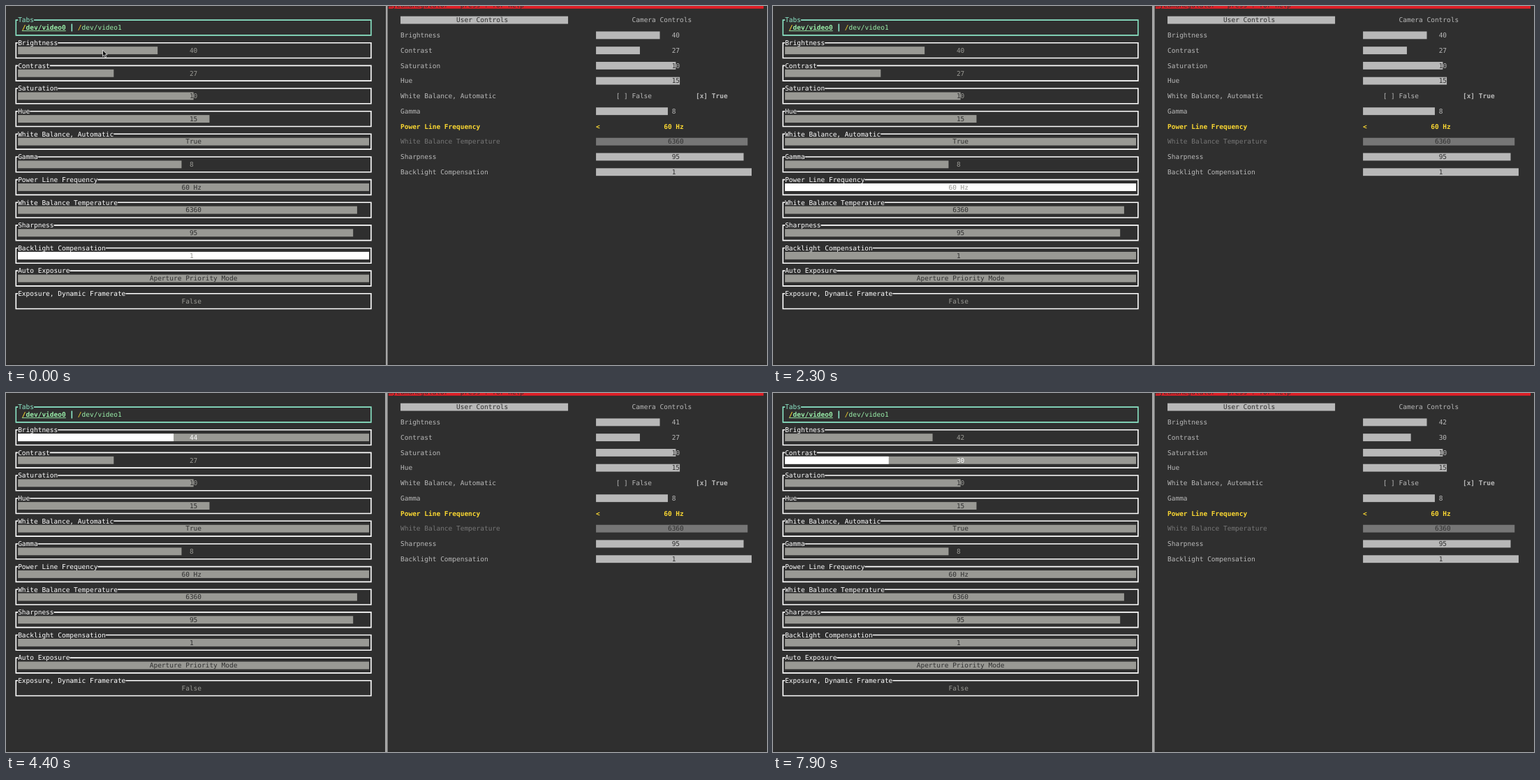
An HTML page that plays this animation: 1090x514 px, repeating every 8000 ms.

```html
<!DOCTYPE html>
<html lang="en">
<head>
<meta charset="utf-8">
<title>Video controls</title>
<style>
html, body { margin: 0; width: 100%; height: 100%; overflow: hidden; background: #2f2f2f; }
svg { display: block; }
text {
  font: 9.493px "DejaVu Sans Mono", monospace;
  text-rendering: geometricPrecision;
  white-space: pre;
}
.bold { font-weight: bold; }
</style>
</head>
<body>
<svg id="stage" width="1090" height="514" viewBox="0 0 1090 514"></svg>
<script>
const CELL = 5.715, LINE = 10.88, TOP = 3.8, RIGHT = 547.9, LOOP = 8000;
const BG = '#2f2f2f', GRAY = '#999994', WHITE = '#fff', SILVER = '#b8b8b8',
      DIM = '#767676', YELLOW = '#fad732', TEAL = '#8be5c6', GREEN = '#9aefaa';
const stage = document.getElementById('stage');

function add(tag, attrs, parent = stage) {
  const el = document.createElementNS('http://www.w3.org/2000/svg', tag);
  for (const key in attrs) el.setAttribute(key, attrs[key]);
  parent.appendChild(el);
  return el;
}
const rowY = row => TOP + row * LINE;
const rect = (x, y, width, height, fill) => add('rect', { x, y, width, height, fill });
const bar = (x, row, cols, fill) => rect(x, rowY(row), cols * CELL, LINE, fill);

function label(x, row, str, fill, bold) {
  const el = add('text', { x, y: rowY(row) + 8.7, fill });
  el.textContent = str;
  if (bold) el.setAttribute('class', 'bold');
  return el;
}

// Titled frame drawn through the middle of its border cells
function frame(row, title, color) {
  const x0 = 2.5 * CELL, x1 = 91.5 * CELL;
  const y0 = rowY(row + .5), y1 = rowY(row + 2.5);
  const gap = (3 + title.length) * CELL;
  add('path', {
    d: `M${3 * CELL} ${y0}H${x0}V${y1}H${x1}V${y0}H${gap}`,
    fill: 'none', stroke: color, 'stroke-width': 1.6
  });
  label(3 * CELL, row, title, color);
}

// Progress bar whose caption changes colour where the fill ends
function meter(x, row, cols, round) {
  const back = bar(x, row, cols, GRAY);
  const fill = bar(x, row, 0, GRAY);
  const text = label(x, row, '', GRAY);
  let last = '';
  return (value, part, look) => {
    const key = value + '/' + part + '/' + look.join();
    if (key === last) return;
    last = key;
    const [backColor, fillColor, onFill, onBack] = look;
    const str = String(value), start = round((cols - str.length) / 2);
    const full = Math.round(cols * part);
    back.setAttribute('fill', backColor);
    fill.setAttribute('fill', fillColor);
    fill.setAttribute('width', full * CELL);
    text.setAttribute('x', x + start * CELL);
    text.textContent = '';
    const cut = Math.max(0, full - start);
    add('tspan', { fill: onFill }, text).textContent = str.slice(0, cut);
    add('tspan', { fill: onBack }, text).textContent = str.slice(cut);
  };
}

const IDLE = ['none', GRAY, BG, GRAY];
const ACTIVE = [GRAY, WHITE, GRAY, WHITE];
const PLAIN = ['none', SILVER, BG, SILVER];
const MUTED = ['none', DIM, BG, DIM];

// name, value, filled part on the left, filled part on the right
const controls = [
  ['Brightness', 40, .4, .4],
  ['Contrast', 27, .27, .27],
  ['Saturation', 10, .5, .51],
  ['Hue', 15, .545, .54],
  ['White Balance, Automatic', 'True', 1, 0],
  ['Gamma', 8, .466, .462],
  ['Power Line Frequency', '60 Hz', 1, 0],
  ['White Balance Temperature', 6360, .966, .974],
  ['Sharpness', 95, .955, .95],
  ['Backlight Compensation', 1, 1, 1],
  ['Auto Exposure', 'Aperture Priority Mode', 1],
  ['Exposure, Dynamic Framerate', 'False', 0]
];

// Left pane
rect(0, 511, 1090, 3, '#2c2c2c');
frame(1, 'Tabs', TEAL);
function tab(col, name, active) {
  const x = col * CELL;
  label(x, 2, '/', YELLOW, active);
  label(x + CELL, 2, name, GREEN, active);
  if (active) rect(x, rowY(2) + 9.6, 11 * CELL, .9, GREEN);
}
tab(4, 'dev/video0', true);
tab(18, 'dev/video1', false);
rect(16.5 * CELL - .8, rowY(2), 1.6, LINE, TEAL);
const left = controls.map(([name], i) => {
  frame(4 + 3 * i, name, WHITE);
  return meter(3 * CELL, 5 + 3 * i, 88, Math.floor);
});

// Right pane
const at = col => RIGHT + col * CELL;
bar(RIGHT, -1, 94, '#df2027');
label(RIGHT, -1, 'myLumaRegulator - press ? for help', BG);
bar(at(3), 1, 42, SILVER);
label(at(17), 1, 'User Controls', BG);
label(at(61), 1, 'Camera Controls', SILVER);
const right = controls.slice(0, 10).map(([name], i) => {
  const row = 3 + 2 * i;
  const color = i === 6 ? YELLOW : i === 7 ? DIM : SILVER;
  label(at(3), row, name, color, i === 6);
  if (i === 4) {
    label(at(57), row, '[ ] False', SILVER);
    label(at(77), row, '[x] True', SILVER, true);
  } else if (i === 6) {
    label(at(52), row, '<', YELLOW, true);
    label(at(69), row, '60 Hz', YELLOW, true);
  } else {
    return meter(at(52), row, 39, Math.ceil);
  }
});

const divider = rect(544, 0, 2.6, 514, '#a6a6a6');
const pointer = add('path', {
  d: 'M0 0V9.2L2.1 7.2L3.6 10.8L5.2 10.1L3.7 6.7H6.5Z',
  fill: '#111', stroke: '#eee', 'stroke-width': .8
});

// Tracks of [time, value]; each value holds until the next
const focus = [[0, 9], [1500, 10], [2000, 9], [2100, 8], [2300, 6], [2400, 5], [2600, 4],
  [2900, 3], [3100, 2], [3200, 1], [3400, 0], [7200, 1]];
const brightness = [[0, 40], [3600, 41], [3900, 42], [4200, 43], [4400, 44],
  [5400, 43], [5600, 42], [5700, 41], [5900, 40],
  [6200, 39], [6400, 40], [6500, 41], [6700, 42]];
const contrast = [[0, 27], [7500, 28], [7700, 29], [7900, 30]];
const polledBrightness = [[0, 40], [4000, 41], [4900, 44], [5900, 41], [6900, 42]];
const polledContrast = [[0, 27], [7900, 30]];

function sample(track, t) {
  let value = track[0][1];
  for (const [time, next] of track) if (t >= time) value = next;
  return value;
}

function draw(t) {
  const selected = sample(focus, t);
  const live = [sample(brightness, t), sample(contrast, t)];
  const polled = [sample(polledBrightness, t), sample(polledContrast, t)];
  controls.forEach(([, value, part, rightPart], i) => {
    const look = i === selected ? ACTIVE : IDLE;
    if (i < 2) left[i](live[i], live[i] / 100, look);
    else left[i](value, part, look);
    if (!right[i]) return;
    if (i < 2) right[i](polled[i], polled[i] / 100, PLAIN);
    else right[i](value, rightPart, i === 7 ? MUTED : PLAIN);
  });

  const p = Math.min(1, Math.floor(t / 100) / 8);
  pointer.setAttribute('transform', `translate(${138.5 - 22 * p} ${63 - 76 * p})`);
  const edge = t < 800 ? 544 : 543;
  divider.setAttribute('x', edge);
  divider.setAttribute('width', 546.6 - edge);
}

function tick() {
  draw(performance.now() % LOOP);
  requestAnimationFrame(tick);
}
tick();
</script>
</body>
</html>
```
